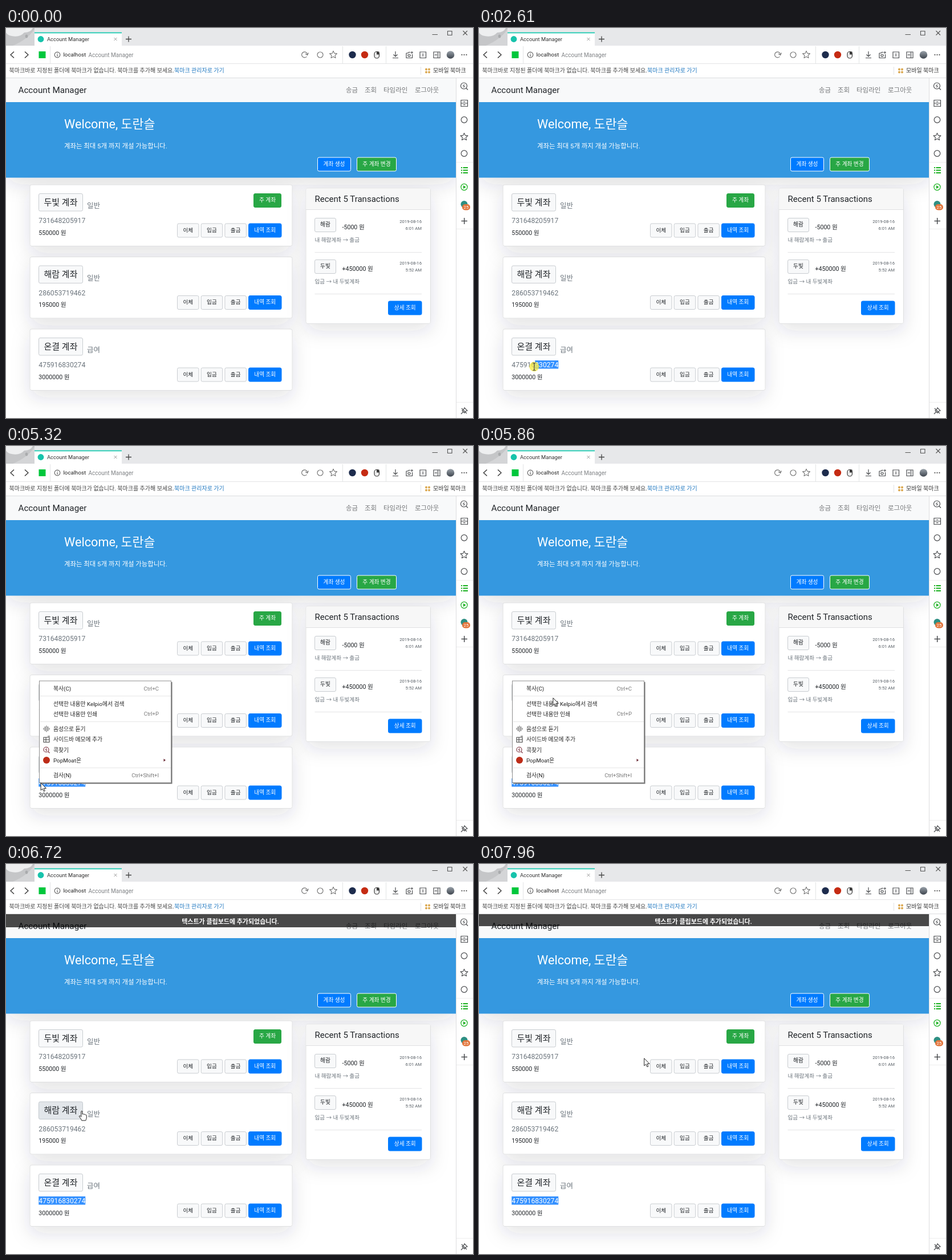
These frames come from a looping animation (819 by 684 pixels, 8 s). An HTML page:

```html
<!DOCTYPE html>
<html lang="ko">
<head>
<meta charset="utf-8">
<style>
html, body { margin: 0; width: 100%; height: 100%; overflow: hidden; background: #fff; }
svg { display: block; width: 819px; height: 684px; }
text { font-family: Roboto, "Noto Sans CJK KR", "Noto Sans CJK", sans-serif; white-space: pre; }
</style>
</head>
<body>
<svg id="stage" viewBox="0 0 819 684" xmlns="http://www.w3.org/2000/svg"></svg>
<script>
const LOOP = 8000, STEP = 77.4;
const INK = '#212529', MUTED = '#6c757d', ICON = '#4b4d50', BLUE = '#007bff', GREEN = '#28a745';
const BANKS = ['두빛', '해람', '온결'];
const NUMBER = '475916830274';

// ---- drawing helpers; text is placed by its vertical centre ----
const text = (x, cy, str, size, fill = INK, extra = '') =>
  `<text x="${x}" y="${cy + size * 0.36}" font-size="${size}" fill="${fill}" ${extra}>${str}</text>`;
const middle = 'text-anchor="middle"', end = 'text-anchor="end"';
const rect = (x, y, w, h, fill, extra = '') =>
  `<rect x="${x}" y="${y}" width="${w}" height="${h}" fill="${fill}" ${extra}/>`;
const disc = (x, y, r, fill, extra = '') => `<circle cx="${x}" cy="${y}" r="${r}" fill="${fill}" ${extra}/>`;
const ring = (x, y, r, color = ICON) => disc(x, y, r, 'none', `stroke="${color}" stroke-width="1.2"`);
const line = (d, color = ICON, width = 1.2) =>
  `<path d="${d}" fill="none" stroke="${color}" stroke-width="${width}"/>`;
const hr = (x1, x2, y, color = '#e3e4e5') => line(`M${x1} ${y}H${x2}`, color, 1);
const vr = (x, y1, y2, color = '#e3e4e5') => line(`M${x} ${y1}V${y2}`, color, 1);

function button(x, y, w, h, label, size, { fill = '#f8f9fa', ink = INK, border = '#c9cdd1', id = '' } = {}) {
  return rect(x, y, w, h, fill, `rx="2.5" stroke="${border}" ${id && `id="${id}"`}`) +
    text(x + w / 2, y + h / 2 - 0.6, label, size, ink, middle);
}
const solid = (fill, border = fill) => ({ fill, ink: '#fff', border });

function star(cx, cy, color = ICON) {
  const points = Array.from({ length: 10 }, (_, i) => {
    const r = i % 2 ? 3.2 : 6.8, a = i * Math.PI / 5 - Math.PI / 2;
    return `${(cx + r * Math.cos(a)).toFixed(1)},${(cy + r * Math.sin(a)).toFixed(1)}`;
  });
  return `<polygon points="${points.join(' ')}" fill="none" stroke="${color}" stroke-width="1.1" stroke-linejoin="round"/>`;
}
const bolt = (x, y, color = ICON) => line(`M${x + 1} ${y - 3}l-2.5 3.4h3l-2 3`, color, 1);

// ---- browser frame ----
function tabStrip() {
  return rect(0, 0, 819, 31, '#e7e8ea') + rect(0, 0, 50, 31, '#c5c6c8') +
    '<path d="M0 0H47Q43 8 32 8Q24 17 10 14Q3 13 0 8Z" fill="#eeeff0"/>' +
    '<path d="M50 2Q38 20 12 31H50Z" fill="#d4d5d7"/>' +
    '<ellipse cx="36" cy="14.5" rx="2.3" ry="3" fill="#a9abad"/>' +
    rect(50, 8, 153, 23, '#fff') + rect(50, 7.5, 153, 1.8, '#1fcbb2') +
    disc(61, 19.5, 5.4, '#17c3ab') + text(72, 19.5, 'Account Manager', 9.4, '#333') +
    line('M189.5 17l5 5M194.500 17l-5 5', '#999', 1) +
    line('M210 19.500H220M215 14.500V24.500', '#444', 1.3) +
    line('M747.500 11.500H757M774.500 5.500H782V12.500H774.500ZM801.500 5l7.500 7.500M809 5l-7.500 7.500', '#555', 1.1);
}

function toolbar() {
  return rect(0, 31, 819, 57, '#fff') + hr(0, 819, 62.5) + hr(0, 819, 87.5, '#dcdddf') +
    line('M14 41.500L8 47L14 52.500M33 41.500L39 47L33 52.500', '#333', 1.3) +
    rect(57.5, 41, 12, 12, '#00c73c') + vr(77.5, 32, 62) + vr(590.5, 32, 62) + vr(666.5, 32, 62) +
    ring(90, 47, 4.800, '#666') + line('M90 46V50M90 44V45', '#666') +
    text(100.5, 47, 'localhost', 9.7, '#222') + text(144.5, 47, 'Account Manager', 10, '#808386') +
    line('M527.500 50A5 5 0 1 1 528.500 46M530.500 43.500L528.500 47.500L525 45', '#777') +
    ring(551, 47, 5, '#777') + star(574, 47, '#777') +
    disc(607.5, 47, 6.2, '#1d2c4d') + disc(629, 47, 6.2, '#c52b13') +
    rect(646, 41.5, 8.5, 11.5, '#eee', 'rx="4" stroke="#3b3b3b" stroke-width="1.2"') + rect(650, 41.5, 4.5, 5, '#3b3b3b') +
    line('M683 41V50M679.500 46.500L683 50L686.500 46.500M678 52.500H688') +
    line('M702 44H705L706 42.500H709M712.500 46V52.500H702V44M709.500 43H714M711.800 41V45') + ring(707, 48, 2) +
    line('M726 42H736.500V52.500H726ZM731.200 44.500V50') +
    line('M750 42H761V52.500H750ZM757.500 42V52.500M752 47.200H756') +
    disc(779.5, 47, 6.8, 'url(#avatar)') +
    [799.5, 803.5, 807.5].map(x => disc(x, 47, 1.1, '#444')).join('') +
    text(5.5, 74.5, '북마크바로 지정된 폴더에 북마크가 없습니다. 북마크를 추가해 보세요.', 10, '#444') +
    text(295, 74.5, '북마크 관리자로 가기', 10, '#1f78c1') + vr(727.5, 68, 82) +
    [[737, 72.5], [742, 72.5], [737, 77.5], [742, 77.5]].map(([x, y]) => disc(x, y, 2, '#dba84e')).join('') +
    text(749, 74.5, '모바일 북마크', 10, '#333');
}

function sidebar() {
  const rows = [245, 249.500, 254];
  return rect(789, 88, 30, 596, '#fff') + vr(789.5, 88, 684, '#dcdddf') +
    ring(803, 101.5, 5.500) + line('M807 105.500L810 108.500') + bolt(803, 101.5) +
    line('M798 126.500H809.500V137.500H798ZM798 132H809.500M802 129.500H805.500M802 134.700H805.500') +
    ring(803.5, 161, 5.300) + star(803.5, 191) + ring(803.5, 220, 5.300) + hr(790, 819, 235.5, '#eee') +
    rows.map(y => line(`M798 ${y}H800M801.500 ${y}H810`, '#19b01f', 1.8)).join('') +
    ring(803.5, 279, 5.600, '#19b01f') + '<path d="M802 276L806.5 279L802 282Z" fill="#19b01f"/>' +
    disc(803.5, 309, 6, '#2e8f83') + rect(800, 309, 14, 10.5, '#e2753c', 'rx="5"') +
    text(807, 314.2, '25', 7.8, '#fff', middle) +
    line('M798.500 338.500H809M803.700 333V344', ICON, 1.5) + hr(790, 819, 352.5, '#eee') + hr(790, 819, 656.5, '#eee') +
    line('M804 666L809 671L806.500 672L804 675L800 671L803 668.500ZM802 673L798 677M799 667L808 676');
}

// ---- web page ----
function header() {
  return rect(0, 130, 789, 132.5, '#3498e0', 'filter="url(#shadow)"') +
    rect(0, 88, 789, 42, '#f8f9fa') +
    text(21.5, 109, 'Account Manager', 15.2) +
    [[596, '송금'], [629, '조회'], [662, '타임라인'], [717, '로그아웃']]
      .map(([x, label]) => text(x, 108.5, label, 11.5, '#77797b')).join('') +
    text(102, 168, 'Welcome, 도란슬', 21.7, '#fff') +
    text(102, 206.5, '계좌는 최대 5개 까지 개설 가능합니다.', 11.4, '#fff') +
    button(546.5, 227, 58, 24, '계좌 생성', 9.7, solid(BLUE, '#fff')) +
    button(615.5, 227, 69, 24, '주 계좌 변경', 9.7, solid(GREEN, '#fff'));
}

const panel = (x, y, w, h) => rect(x, y, w, h, '#fff', 'rx="3" stroke="#dfe0e1" filter="url(#shadow)"');

function account(y, index, kind, number, amount) {
  return panel(42, y, 460, 107.5) +
    button(57.5, y + 15.5, 77, 30.5, BANKS[index] + ' 계좌', 15, { id: 'bank' + index }) +
    text(142, y + 36.5, kind, 12.5, MUTED) +
    text(57.3, y + 62.7, number, 12.16, MUTED) +
    text(57.3, y + 83.7, amount + ' 원', 10.64) +
    ['이체', '입금', '출금'].map((label, i) => button(300.5 + i * 41.7, y + 68, 37.5, 24, label, 9.6)).join('') +
    button(425.5, y + 68, 57.5, 24, '내역 조회', 9.7, solid(BLUE)) +
    (index ? '' : button(434.5, y + 15.5, 48, 24, '주 계좌', 9.7, solid(GREEN)));
}

function transaction(y, bank, amount, time, note) {
  return button(541.5, y, 37, 24, bank, 9.7) + text(589.5, y + 15.7, amount + ' 원', 10.64) +
    text(729, y + 6, '2019-08-16', 7.7, '#555c63', end) + text(729, y + 17.5, time, 7.7, '#555c63', end) +
    text(541.5, y + 38.5, note, 9.6, MUTED) + hr(541.5, 729, y + 60);
}

function transactions() {
  return panel(526, 281, 218.5, 237.5) + rect(526.5, 281.5, 217.5, 37, '#f7f7f7') + hr(526, 744, 318.5, '#dfe0e1') +
    text(541.5, 300, 'Recent 5 Transactions', 15) +
    transaction(333.5, BANKS[1], '-5000', '6:01 AM', `내 ${BANKS[1]}계좌 → 출금`) +
    transaction(406.5, BANKS[0], '+450000', '5:52 AM', `입금 → 내 ${BANKS[0]}계좌`) +
    button(670.5, 479, 58.5, 24, '상세 조회', 9.7, solid(BLUE));
}

// ---- context menu ----
const MENU = [
  [425.5, '복사(C)', 'Ctrl+C'], [452, '선택한 내용만 Kelpio에서 검색'], [470, '선택한 내용만 인쇄', 'Ctrl+P'],
  [496, '음성으로 듣기'], [514.5, '사이드바 메모에 추가'], [533, '콕찾기'], [551, 'PopMoat은'], [577.5, '검사(N)', 'Ctrl+Shift+I']
];
function contextMenu() {
  return '<g id="menu">' + rect(60.5, 414, 231, 178.5, '#777') +
    rect(58.5, 412, 231, 178.5, '#fff', 'stroke="#8f8f8f"') + rect(60, 0, 228.5, 18.5, '#e9e9ea', 'id="hover"') +
    [438.5, 483.5, 564.5].map(y => hr(60, 289, y, '#e6e6e6')).join('') +
    MENU.map(([y, label, key]) => text(83, y, label, 9.8, '#222') + (key ? text(268, y, key, 9.5, '#777', end) : '')).join('') +
    line('M66 494.500V497.500M68.500 492V500M71 490.500V501.500M73.500 492V500M76 494.500V497.500', '#444', 1) +
    line('M66 511H76V519.500H66ZM66 515H76M70 511V519.500M73 509H77', '#444', 1.1) +
    ring(70.5, 532.5, 4.5, '#7b3340') + line('M74 536l2.500 2.500', '#7b3340') + bolt(70.5, 532.5, '#7b3340') +
    disc(71, 551, 6, '#bd2c18') + '<path d="M276.500 548.500l3.500 2.500l-3.500 2.500Z" fill="#6b2a35"/></g>';
}

const CURSORS = `<g id="cursor">
  <path id="arrow" d="M0 0V13L3 10.400L5.200 15L7.200 14.100L5.100 9.600H9.300Z" fill="#fff" stroke="#222"/>
  <path id="beam" d="M-2.500-6.500Q0-6.500 0-5V5Q0 6.500-2.500 6.500M2.500-6.500Q0-6.500 0-5M0 5Q0 6.500 2.500 6.500" fill="none" stroke="#444" stroke-width="1.200"/>
  <path id="hand" d="M-1 1Q0-.800 1.200 1V6Q3 4.800 4 6.300Q5.500 5.300 6.500 7Q8.500 6.500 8.500 8.500V12Q8 14.500 7 17H0Q-1 14-4.500 10Q-4.500 8-2.500 9L-1 10.500Z" fill="#fff" stroke="#222"/>
</g>`;

const stage = document.getElementById('stage');
stage.innerHTML = `<defs>
  <filter id="shadow" x="-20%" y="-40%" width="140%" height="200%"><feDropShadow dx="0" dy="12" stdDeviation="16" flood-color="#20303c" flood-opacity=".13"/></filter>
  <linearGradient id="avatar" x2="0" y2="1"><stop stop-color="#9aa2aa"/><stop offset="1" stop-color="#3d444d"/></linearGradient>
  <clipPath id="page"><rect y="88" width="789" height="596"/></clipPath>
  <clipPath id="selected"><rect id="selectClip" y="583" height="14.500"/></clipPath>
</defs>` + rect(0, 0, 819, 684, '#fff') +
  `<g clip-path="url(#page)">${header()}
  ${account(275, 0, '일반', '731648205917', '550000')}${account(401.5, 1, '일반', '286053719462', '195000')}
  ${account(528, 2, '급여', NUMBER, '3000000')}${transactions()}
  ${rect(0, 583, 0, 14.5, '#3390ff', 'id="selection"')}
  <g clip-path="url(#selected)">${text(57.3, 590.7, NUMBER, 12.16, '#fff')}</g>
  <g id="toast">${rect(0, 88, 789, 23, '#000', 'id="toastBar" fill-opacity=".71"')}
  ${text(393.5, 101.5, '텍스트가 클립보드에 추가되었습니다.', 11, '#fff', middle + ' font-weight="700"')}</g></g>` +
  tabStrip() + toolbar() + sidebar() + contextMenu() +
  disc(0, 0, 8.5, '#f4ea3c', 'id="press" fill-opacity=".75"') + CURSORS;

// ---- motion ----
const PATH = [
  [523, 660, 692], [600, 628, 678], [850, 430, 640], [1100, 270, 612], [1370, 153, 591], [1540, 143, 586],
  [1700, 143, 586], [1910, 140, 591], [2220, 138, 591], [2300, 133, 592], [2610, 97, 594], [3070, 62, 593],
  [3380, 61, 592], [3690, 60, 591], [5240, 60, 591], [5320, 61, 591], [5480, 76, 563], [5860, 130, 442],
  [6100, 126, 429], [6250, 124, 425], [6400, 124, 425], [6720, 133, 433], [7110, 133, 433], [7180, 140, 428],
  [7500, 207, 390], [7960, 291, 340], [8000, 291, 340]
];
const clamp = v => Math.max(0, Math.min(1, v));
const between = (t, a, b) => t >= a && t < b;

function pointer(t) {
  const i = Math.max(1, PATH.findIndex(p => p[0] >= t));
  const [t0, x0, y0] = PATH[i - 1], [t1, x1, y1] = PATH[i];
  const p = clamp((t - t0) / (t1 - t0));
  return [x0 + (x1 - x0) * p, y0 + (y1 - y0) * p];
}

const el = id => document.getElementById(id);
const set = (id, attrs) => { for (const k in attrs) el(id).setAttribute(k, attrs[k]); };
const show = (id, on) => set(id, { visibility: on ? 'visible' : 'hidden' });

function draw(ms) {
  const t = ms < 590 ? 0 : 600 + Math.floor((ms - 585) / STEP) * STEP;
  const [x, y] = pointer(t);

  const digit = 81.9 / 12;
  const from = t < 2200 ? 12 : t < 3690 ? Math.max(0, Math.min(12, Math.round((x - 57.3) / digit))) : 0;
  const box = { x: 57.3 + from * digit, width: (12 - from) * digit };
  set('selection', box);
  set('selectClip', box);

  const menuOpen = between(t, 4610, 6470);
  show('menu', menuOpen);
  set('menu', { opacity: clamp(0.5 + (t - 4610) / 320) });
  const item = menuOpen && t > 5350 && MENU.find(m => Math.abs(m[0] - y) < 9.2);
  show('hover', item);
  if (item) set('hover', { y: item[0] - 9.2 });

  const onButton = t >= 6470 && x < 134.6 && y > 417;
  set('bank1', { fill: onButton ? '#e2e6ea' : '#f8f9fa', stroke: onButton ? '#c3c9ce' : '#c9cdd1' });

  set('toast', { opacity: clamp((t - 6400) / 280) });
  set('toastBar', { height: 23 - 2 * clamp((t - 7110) / 800) });

  show('press', between(t, 2050, 3920) || between(t, 4460, 4610));
  set('press', { cx: x, cy: y });
  const shape = onButton ? 'hand' : between(t, 1760, 4610) ? 'beam' : 'arrow';
  for (const id of ['arrow', 'beam', 'hand']) show(id, t > 0 && id === shape);
  set('cursor', { transform: `translate(${x.toFixed(1)} ${y.toFixed(1)})` });
}

const start = performance.now();
function tick() {
  draw((performance.now() - start) % LOOP);
  requestAnimationFrame(tick);
}
tick();
</script>
</body>
</html>
```
